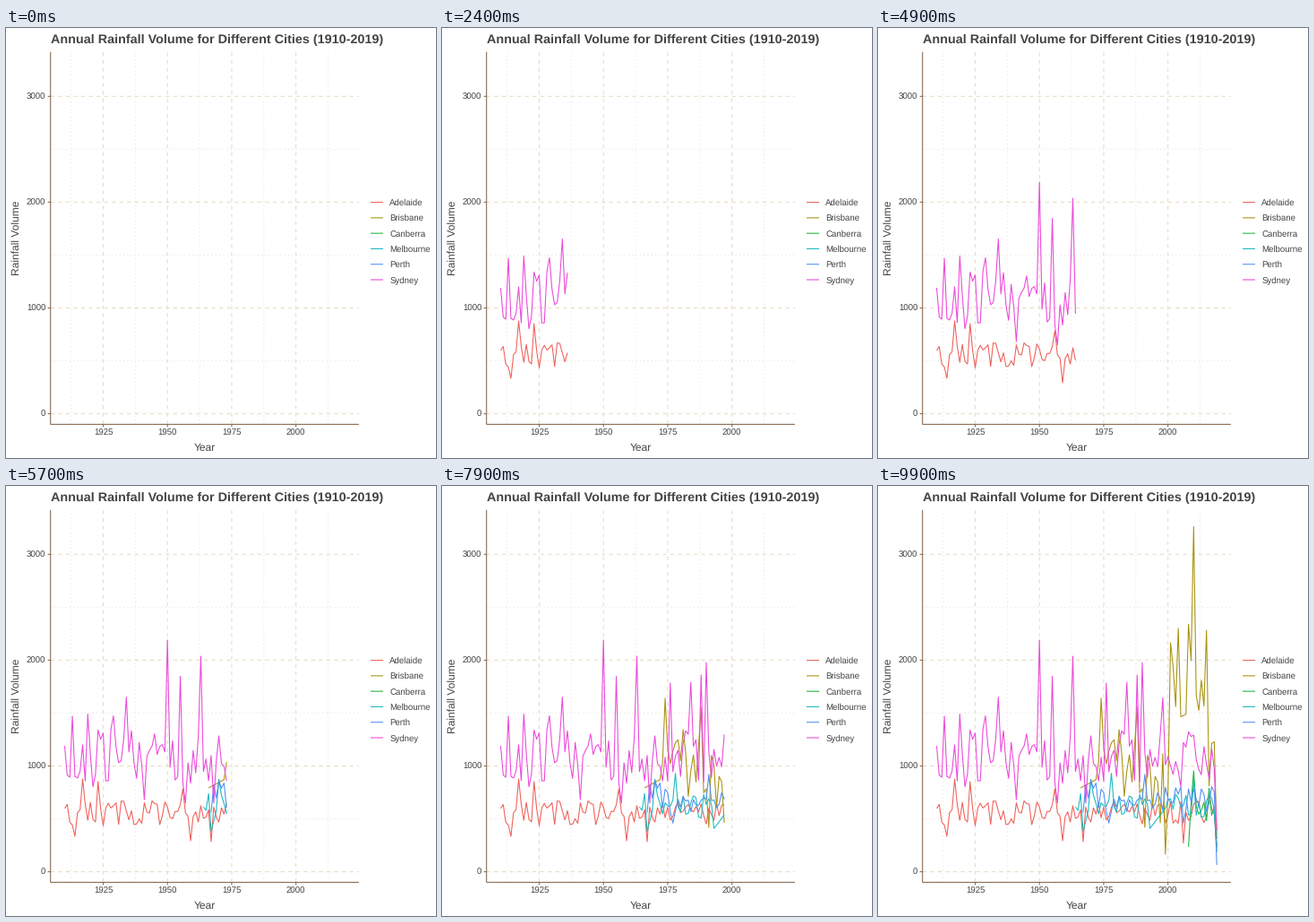
Recreate the animation shown at these times as a matplotlib script. Size 480 by 480 pixels, loop 10 s.

```python
import random

import matplotlib.pyplot as plt
import numpy as np
from matplotlib.animation import FuncAnimation

plt.rcParams.update({"font.family": "Liberation Sans", "text.hinting": "none"})

SIZE, DPI = 480, 72
FRAMES, INTERVAL = 100, 100
FIRST, LAST = 1910, 2019
INK, BROWN = "#444444", "#86664d"
MAJOR, MINOR = "#e8dcc6", "#ebe5da"
LEFT, RIGHT, TOP, BOTTOM = 49.7, 393.9, 26.7, 442.4


def rainfall(name, low, high, marks, gap=(0, 0), wet=(0, 0), lift=0):
    """Seeded yearly noise pinned to a few marked years, straight over a gap."""
    rng = random.Random(name)
    span = np.arange(min(marks), LAST + 1)
    known = {}
    for year in span:
        noise = rng.uniform(low, high)
        if wet[0] <= year <= wet[1]:
            noise += lift
        if not gap[0] < year < gap[1]:
            known[year] = marks.get(year, noise)
    return span, np.interp(span, list(known), list(known.values()))


CITIES = [
    ("Adelaide", "#f0605a", dict(low=430, high=670, marks={
        1910: 598, 1914: 335, 1917: 877, 1923: 852, 1956: 784,
        1959: 293, 1967: 284, 2006: 270, 2016: 730, 2019: 230})),
    ("Brisbane", "#a8920c", dict(low=600, high=1250, marks={
        1966: 793, 1972: 870, 1974: 1640, 1981: 1343, 1988: 1555, 1991: 420,
        1997: 462, 1999: 165, 2001: 2165, 2004: 2300, 2008: 2340, 2010: 3262,
        2015: 2283, 2019: 310}, gap=(1966, 1972), wet=(2001, 2015), lift=800)),
    ("Canberra", "#20b53c", dict(low=450, high=680, marks={
        2008: 235, 2010: 955, 2016: 790, 2019: 240})),
    ("Melbourne", "#1ab9bf", dict(low=470, high=740, marks={
        1964: 612, 1967: 380, 1970: 875, 1978: 930, 1993: 410, 1999: 600,
        2010: 870, 2019: 190}, gap=(1993, 1999))),
    ("Perth", "#508ef4", dict(low=560, high=840, marks={
        1967: 560, 1970: 865, 1977: 460, 1991: 920, 2006: 460, 2019: 64})),
    ("Sydney", "#ec48db", dict(low=800, high=1350, marks={
        1910: 1190, 1913: 1470, 1915: 886, 1919: 1491, 1929: 1474, 1934: 1652,
        1941: 682, 1950: 2190, 1955: 1847, 1957: 648, 1963: 2037, 1968: 650,
        1976: 1783, 1984: 1792, 1988: 1860, 1990: 1978, 1998: 1644,
        2019: 390})),
]


def px(year):
    return 108.5 + (year - 1925) * 2.869


def py(mm):
    return 430.6 - mm * 0.1181


fig = plt.figure(figsize=(SIZE / DPI, SIZE / DPI), dpi=DPI, facecolor="white")
ax = fig.add_axes([0, 0, 1, 1])
ax.set(xlim=(0, SIZE), ylim=(SIZE, 0))
ax.axis("off")


def rule(x, y, color, **kw):
    return ax.plot(x, y, color=color, lw=1.07, snap=False,
                   solid_capstyle="butt", dash_capstyle="butt", **kw)[0]


def label(x, y, text, size=9.6, ha="left", **kw):
    ax.text(x, y, text, fontsize=size, color=INK, ha=ha, va="baseline", **kw)


def grid(years, amounts, color, dashes):
    for mm in amounts:
        rule([LEFT, RIGHT], [py(mm)] * 2, color, dashes=dashes)
    for year in years:
        rule([px(year)] * 2, [BOTTOM, TOP], color, dashes=dashes)


years, amounts = np.arange(1925, 2001, 25), np.arange(0, 3001, 1000)
grid(np.arange(1912.5, 2013, 25), amounts[:-1] + 500, MINOR, (1, 3))
grid(years, amounts, MAJOR, (4, 4))

curves = []
for i, (name, color, climate) in enumerate(CITIES):
    span, mm = rainfall(name, **climate)
    curves.append((rule([], [], color), span, px(span), py(mm)))
    y = 194.6 + 17.28 * i
    rule([407, 421], [y, y], color)
    label(428.4, y + 3.5, name)

rule([LEFT, LEFT], [TOP, BOTTOM], BROWN)
rule([LEFT, RIGHT], [BOTTOM, BOTTOM], BROWN)
for year in years:
    rule([px(year)] * 2, [BOTTOM, BOTTOM + 3], BROWN)
    label(px(year), 455.2, str(year), ha="center")
for mm in amounts:
    rule([LEFT - 3, LEFT], [py(mm)] * 2, BROWN)
    label(44.4, py(mm) + 3.5, str(mm), ha="right")

label(49.8, 17, "Annual Rainfall Volume for Different Cities (1910-2019)",
      14.4, weight="bold")
label(222.2, 472, "Year", 12, ha="center")
label(14.6, 234.5, "Rainfall Volume", 12, ha="center", rotation=90,
      rotation_mode="anchor")


def update(frame):
    # A year shows once its time, rounded to a whole frame, is reached.
    end = FIRST + int((frame + 0.5) * (LAST - FIRST) / (FRAMES - 1))
    for line, span, x, y in curves:
        shown = span <= end
        line.set_data(x[shown], y[shown])
    return [curve[0] for curve in curves]


anim = FuncAnimation(fig, update, frames=FRAMES, interval=INTERVAL,
                     repeat=True, repeat_delay=0, blit=False)
plt.show()
```
